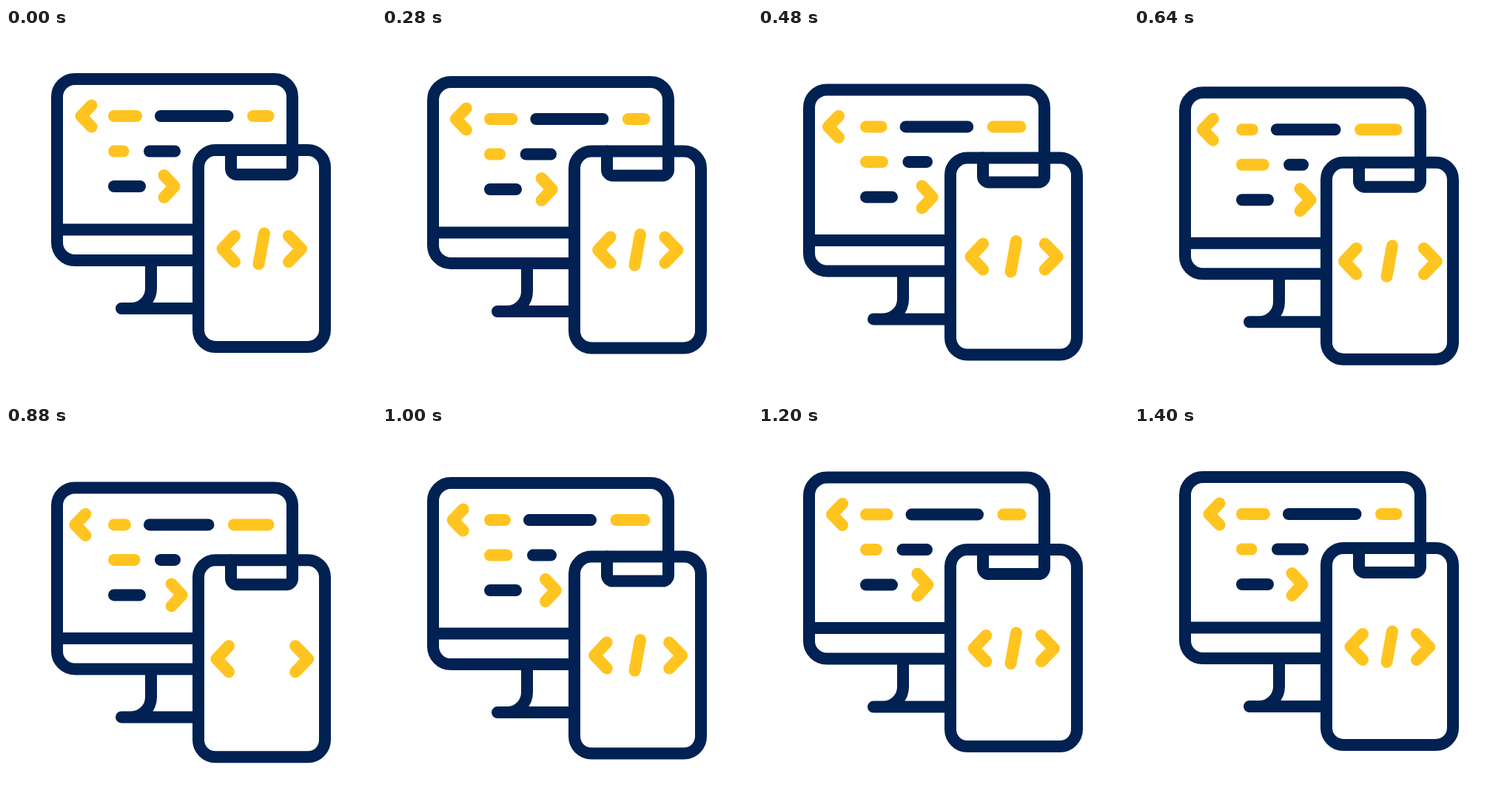
Write an HTML page with a canvas that moves like this. It is 500x500 px and loops after 1.52 s.

```html
<!DOCTYPE html>
<html lang="en">
<head>
<meta charset="utf-8">
<title>Coding on desktop and phone</title>
<style>
html, body { margin: 0; width: 100%; height: 100%; overflow: hidden; background: #fff; }
canvas { display: block; width: 500px; height: 500px; }
</style>
</head>
<body>
<canvas id="stage" width="500" height="500"></canvas>
<script>
const ctx = document.getElementById('stage').getContext('2d');
const NAVY = '#002152', YELLOW = '#ffc41f';
const LOOP = 1520, STEP = 40;

// Symmetric ease-in-out, then a there-and-back swing from 0 to 1 to 0.
const ease = x => {
  x = Math.min(1, Math.max(0, x));
  return x ** 1.85 / (x ** 1.85 + (1 - x) ** 1.85);
};
const swing = (t, start, peak, end) =>
  t < peak ? ease((t - start) / (peak - start)) : ease((end - t) / (end - peak));

function stroke(color, d) {
  ctx.strokeStyle = color;
  ctx.stroke(new Path2D(d));
}

function box(x, y, w, h, r) {
  ctx.beginPath();
  ctx.roundRect(x, y, w, h, r);
  ctx.fillStyle = '#fff';
  ctx.fill();
  ctx.strokeStyle = NAVY;
  ctx.stroke();
}

// left and right are the outer ends of the rounded bar
const bar = (color, left, right, y) => stroke(color, `M${left + 8} ${y}H${right - 8}`);

// dx is signed: it points from the tip to the open side
const chevron = (x, y, dx, dy) =>
  stroke(YELLOW, `M${x + dx} ${y - dy}L${x} ${y}L${x + dx} ${y + dy}`);

function drawMonitor(code, bars) {
  stroke(NAVY, 'M196 314V352A27 27 0 0 1 169 379M156 379H260');
  box(69, 69, 318, 245, 24);
  stroke(NAVY, 'M69 272.5H260');

  chevron(101.5 - 9 * code, 119, 14, 14.5);
  const near = 17 * bars, far = 29.5 * bars;
  bar(YELLOW, 138, 184 - near, 119);
  bar(NAVY, 201 - near, 307.5 - far, 119);
  bar(YELLOW, 326 - far, 362.5, 119);

  bar(YELLOW, 138, 166.5 + near, 166.5);
  bar(NAVY, 186 + near, 236, 166.5);

  bar(NAVY, 138, 189, 214);
  chevron(227.5 + 11.3 * code, 214, -14, 15);
}

function drawPhone(spread, showSlash) {
  box(260, 165, 171, 266, 23);
  stroke(NAVY, 'M304 165V190A8 8 0 0 0 312 198H379A8 8 0 0 0 387 190V165');
  chevron(292.5 - 9 * spread, 298.5, 16.5, 17.5);
  chevron(399 + 10.4 * spread, 298.5, -17, 17.5);
  if (showSlash) stroke(YELLOW, 'M349 277.5L341.5 319');
}

function at(dy, draw) {
  ctx.save();
  ctx.translate(0, dy);
  draw();
  ctx.restore();
}

function frame(now) {
  const t = Math.floor(now % LOOP / STEP) * STEP;
  const code = swing(t, 80, 720, 1400);
  const bars = swing(t, 200, 730, 1330);
  const showSlash = t < 760 || t >= 960;

  ctx.clearRect(0, 0, 500, 500);
  ctx.lineWidth = 16;
  ctx.lineCap = ctx.lineJoin = 'round';
  at(18.4 * swing(t, 80, 680, 1280), () => drawMonitor(code, bars));
  at(17.8 * swing(t, 150, 750, 1350), () => drawPhone(bars, showSlash));
}

const origin = performance.now();
function tick() {
  frame(performance.now() - origin);
  requestAnimationFrame(tick);
}
tick();
</script>
</body>
</html>
```
